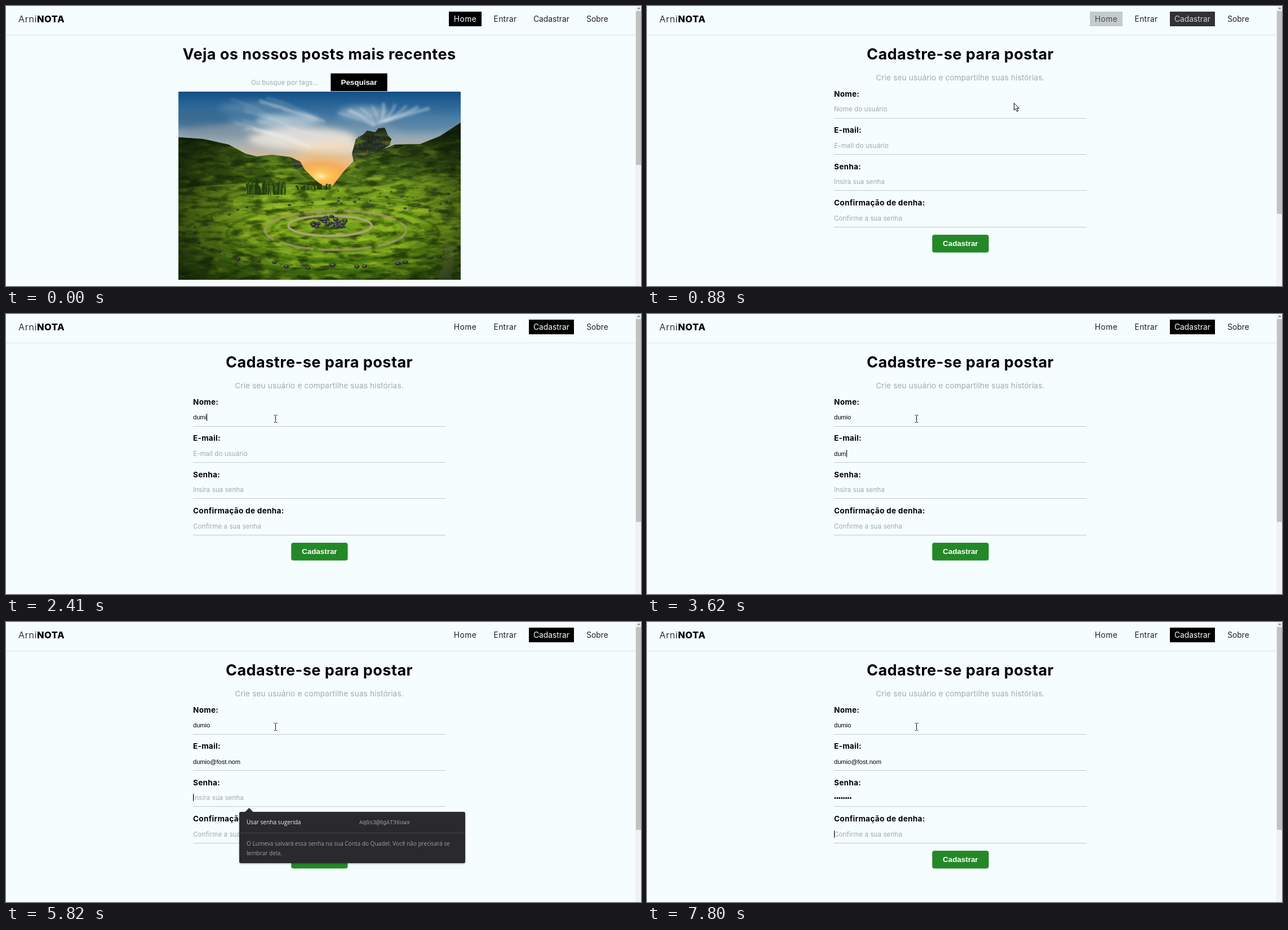
An HTML page for the animation above (8000 ms loop, 1127x497 px).

```html
<!DOCTYPE html>
<html lang="pt-BR">
<head>
<meta charset="utf-8">
<title>Cadastro</title>
<style>
html, body { margin: 0; width: 100%; height: 100%; overflow: hidden; background: #f5fdff; }
svg { display: block; width: 1127px; height: 497px; }
text { font-family: Inter, "Open Sans", sans-serif; font-optical-sizing: none; white-space: pre; }
.arial { font-family: "Liberation Sans", Arial, sans-serif; }
.ui { font-family: "Open Sans", "Noto Sans", sans-serif; }
.mono { font-family: "Liberation Mono", monospace; }
</style>
</head>
<body>
<svg id="stage" viewBox="0 0 1127 497" xmlns="http://www.w3.org/2000/svg">
  <defs>
    <linearGradient id="sky" x1="0" y1="0" x2="0" y2="1">
      <stop offset="0" stop-color="#125089"/>
      <stop offset=".22" stop-color="#3a729f"/>
      <stop offset=".48" stop-color="#97a9b4"/>
      <stop offset=".72" stop-color="#dcc0a0"/>
      <stop offset="1" stop-color="#f39a3a"/>
    </linearGradient>
    <radialGradient id="sun">
      <stop offset="0" stop-color="#fff6c0"/>
      <stop offset=".12" stop-color="#ffc95a"/>
      <stop offset=".4" stop-color="#fba94a" stop-opacity=".75"/>
      <stop offset="1" stop-color="#f8d9a8" stop-opacity="0"/>
    </radialGradient>
    <linearGradient id="left" x1="0" y1="0" x2=".25" y2="1">
      <stop offset="0" stop-color="#3f5a15"/>
      <stop offset=".4" stop-color="#56801a"/>
      <stop offset="1" stop-color="#27420c"/>
    </linearGradient>
    <linearGradient id="right" x1="0" y1="0" x2="0" y2="1">
      <stop offset="0" stop-color="#2d3a16"/>
      <stop offset=".5" stop-color="#446618"/>
      <stop offset="1" stop-color="#648c1e"/>
    </linearGradient>
    <linearGradient id="grass" x1="0" y1="0" x2="0" y2="1">
      <stop offset="0" stop-color="#6f9620"/>
      <stop offset=".45" stop-color="#7ba51c"/>
      <stop offset="1" stop-color="#41700e"/>
    </linearGradient>
    <radialGradient id="shade" cx=".55" cy=".66" r=".62">
      <stop offset=".45" stop-color="#0a1606" stop-opacity="0"/>
      <stop offset="1" stop-color="#0a1606" stop-opacity=".8"/>
    </radialGradient>
    <filter id="soft" x="-30%" y="-60%" width="160%" height="220%"><feGaussianBlur stdDeviation="6"/></filter>
    <filter id="wisp" x="-30%" y="-60%" width="160%" height="220%"><feGaussianBlur stdDeviation="2.2"/></filter>
    <filter id="dark" x="0" y="0" width="100%" height="100%" color-interpolation-filters="sRGB">
      <feTurbulence type="fractalNoise" baseFrequency=".035 .1" numOctaves="4" seed="4"/>
      <feColorMatrix values="0 0 0 0 .07  0 0 0 0 .13  0 0 0 0 .02  3.4 0 0 0 -1.5"/>
    </filter>
    <filter id="lit" x="0" y="0" width="100%" height="100%" color-interpolation-filters="sRGB">
      <feTurbulence type="fractalNoise" baseFrequency=".03 .09" numOctaves="4" seed="11"/>
      <feColorMatrix values="0 0 0 0 .68  0 0 0 0 .8  0 0 0 0 .16  3.4 0 0 0 -1.65"/>
    </filter>
    <filter id="drop" x="-10%" y="-10%" width="120%" height="125%">
      <feDropShadow dx="0" dy="1" stdDeviation="1.5" flood-opacity=".35"/>
    </filter>
    <clipPath id="frame"><rect x="306" y="152" width="501" height="334"/></clipPath>
  </defs>
</svg>
<script>
const LOOP = 8000;
const stage = document.getElementById('stage');

function add(parent, tag, attrs, content) {
  const node = document.createElementNS('http://www.w3.org/2000/svg', tag);
  for (const k in attrs) node.setAttribute(k, attrs[k]);
  if (content) node.textContent = content;
  parent.append(node);
  return node;
}
const group = (parent, attrs = {}) => add(parent, 'g', attrs);
const rect = (parent, x, y, width, height, fill, rx = 0) =>
  add(parent, 'rect', { x, y, width, height, fill, rx });
const path = (parent, d, attrs) => add(parent, 'path', { d, ...attrs });
const text = (parent, x, y, str, size, fill, attrs = {}) =>
  add(parent, 'text', { x, y, 'font-size': size, fill, ...attrs }, str);
const show = (node, on) => node.setAttribute('visibility', on ? 'visible' : 'hidden');
const MID = { 'text-anchor': 'middle' };
const TITLE = { ...MID, 'font-weight': 700, 'letter-spacing': .48 };
const BUTTON = { ...MID, class: 'arial', 'font-weight': 700 };

let seed = 7;
const rnd = (a, b) => {
  seed = (seed * 16807) % 2147483647;
  return a + (b - a) * seed / 2147483647;
};

// header
for (let i = 0; i < 4; i++) {
  rect(stage, 0, 50 + i, 1117, 1, `rgba(20,60,70,${[.06, .045, .028, .012][i]})`);
}
const logo = text(stage, 22, 29, '', 16.4, '#000', { 'letter-spacing': .6 });
add(logo, 'tspan', { 'font-weight': 300 }, 'Arni');
add(logo, 'tspan', { 'font-weight': 800 }, 'NOTA');

const menu = [
  ['Home', 786, 58, .4], ['Entrar', 857, 58, .3], ['Cadastrar', 928, 80, 0], ['Sobre', 1021, 57, 0],
].map(([name, x, w, gap]) => ({
  box: rect(stage, x, 10, w, 26, '#000'),
  label: text(stage, x + w / 2, 28, name, 13.8, '#222', { ...MID, 'letter-spacing': gap }),
}));

function setActive(item, amount) {
  const c = Math.round(30 + 225 * amount);
  item.box.setAttribute('fill-opacity', amount);
  item.label.setAttribute('fill', `rgb(${c},${c},${c})`);
}

// scrollbar
rect(stage, 1117, 0, 10, 497, '#f1f1f1');
path(stage, 'M1120 5.5l3-3.5 3 3.5z', { fill: '#8a8a8a' });
const thumb = rect(stage, 1118, 9, 9, 273, '#c1c1c1');

// home page
const home = group(stage);
text(home, 556, 94.5, 'Veja os nossos posts mais recentes', 27, '#000', TITLE);
text(home, 435, 139.5, 'Ou busque por tags...', 11.5, '#a2a8a9', { 'letter-spacing': .1 });
rect(home, 576.3, 119.6, 100.4, 31.6, '#000');
text(home, 626.5, 139.5, 'Pesquisar', 13.4, '#fff', BUTTON);
drawPhoto(group(home, { 'clip-path': 'url(#frame)' }));

function drawPhoto(g) {
  const rightHill = 'M575 325L600 293 618 274 650 262 690 246 735 245 770 231 807 207V360H575z';
  const rock = 'M617 276L614 262 621 236 634 228 641 221 655 224 661 217 672 216 678 230 684 236 681 247 655 262z';
  const leftHill = 'M306 233L350 236 395 246 425 262 445 267 472 264 505 268 522 276 530 290 548 308 566 322 540 340H306z';
  const field = 'M306 325Q420 308 540 318T700 310T807 300V486H306z';
  const land = add(g, 'clipPath', { id: 'land' });
  for (const d of [rightHill, rock, leftHill, field]) path(land, d);

  rect(g, 306, 152, 501, 172, 'url(#sky)');
  const clouds = group(g, { filter: 'url(#soft)' });
  [[525, 235, 95, 20, '#f3e9de', .8], [500, 203, 55, 11, '#d3dde2', .65], [340, 200, 60, 18, '#2f648c', .65],
   [385, 224, 70, 10, '#8194a0', .8], [740, 208, 60, 14, '#4d7fa5', .6], [590, 252, 80, 12, '#f6e0c2', .8],
   [635, 190, 45, 12, '#c3d2da', .5], [440, 180, 60, 9, '#6d93b0', .6]]
    .forEach(([cx, cy, rx, ry, fill, opacity]) => add(clouds, 'ellipse', { cx, cy, rx, ry, fill, opacity }));
  const wisps = group(g, { filter: 'url(#wisp)', fill: 'none', stroke: '#eef1f2', 'stroke-linecap': 'round' });
  for (let i = 0; i < 9; i++) {
    path(wisps, `M${650 + i * 3} ${212 - i}q${-25 + i * 9} -14 ${-60 + i * 17} ${-34 + Math.abs(i - 4) * 3}`,
      { 'stroke-width': rnd(2, 6), opacity: .42 });
  }
  for (let i = 0; i < 16; i++) {
    const x = rnd(380, 500), y = rnd(160, 225);
    path(wisps, `M${x} ${y}q40 ${rnd(4, 12)} ${rnd(60, 120)} ${rnd(20, 38)}`,
      { 'stroke-width': rnd(1, 5), opacity: rnd(.15, .45) });
  }
  add(g, 'ellipse', { cx: 558, cy: 302, rx: 110, ry: 56, fill: 'url(#sun)' });

  path(g, rightHill, { fill: 'url(#right)' });
  path(g, rock, { fill: '#3a4238' });
  for (let i = 0; i < 26; i++) {
    const x = rnd(623, 676), y = rnd(228, 252);
    path(g, `M${x} ${y}l${rnd(-3, 3)} ${rnd(4, 9)}`, { stroke: i % 2 ? '#6f7a70' : '#20282a', opacity: .7 });
  }
  path(g, leftHill, { fill: 'url(#left)' });
  path(g, 'M438 268Q475 262 498 275L540 312 480 318Q460 290 438 268z', { fill: '#7da328', opacity: .5 });
  path(g, 'M505 269L523 277 529 292 516 290 508 280z', { fill: '#3d443a' });
  path(g, field, { fill: 'url(#grass)' });

  const ring = (cx, cy, rx, ry, stroke, w, opacity, dash = 'none') => add(g, 'ellipse',
    { cx, cy, rx, ry, fill: 'none', stroke, 'stroke-width': w, opacity, 'stroke-dasharray': dash });
  ring(578, 408, 262, 66, '#35600f', 6, .4);
  ring(578, 406, 235, 56, '#9cc030', 8, .35);
  ring(580, 404, 188, 49, '#35600f', 5, .45);
  ring(582, 400, 156, 42, '#9cc42c', 9, .4);
  ring(582, 398, 110, 29, '#3f6f12', 6, .45);
  ring(577, 394, 92, 23, '#93bd2a', 8, .5);

  // uneven light over the grass
  const relief = group(g, { 'clip-path': 'url(#land)' });
  rect(relief, 306, 200, 501, 286, '#000').setAttribute('filter', 'url(#lit)');
  rect(relief, 306, 200, 501, 286, '#000').setAttribute('filter', 'url(#dark)');
  relief.setAttribute('opacity', .6);

  ring(585, 398, 125, 35, '#a3956c', 4, .75, '60 12 95 8');
  ring(575, 390, 74, 18, '#b3a580', 4, .9);

  for (let i = 0; i < 80; i++) {
    const x = i < 55 ? rnd(428, 496) : rnd(515, 585), h = i < 55 ? rnd(14, 25) : rnd(4, 11);
    path(g, `M${x} ${i < 55 ? 335 : 326}q${rnd(-3, 3)} ${-h / 2} ${rnd(-4, 4)} ${-h}`,
      { fill: 'none', stroke: i % 3 ? '#24400f' : '#3f6119', 'stroke-width': 3 });
  }

  const stone = (cx, cy, r) => {
    add(g, 'ellipse', { cx, cy, rx: r, ry: r * .65, fill: '#2f3330' });
    add(g, 'ellipse', { cx: cx - r * .15, cy: cy - r * .2, rx: r * .5, ry: r * .25, fill: '#757a76' });
  };
  for (let i = 0; i < 44; i++) {
    const a = i / 44 * Math.PI * 2 + rnd(-.07, .07), k = rnd(.94, 1.05);
    stone(578 + 245 * k * Math.cos(a), 405 + 58 * k * Math.sin(a), rnd(1.5, 3) + 2.5 * Math.max(0, Math.sin(a)));
  }
  for (let i = 0; i < 22; i++) stone(rnd(560, 800), rnd(326, 356), rnd(1.5, 3.5));
  for (let i = 0; i < 60; i++) {
    const x = rnd(-31, 31);
    stone(575 + x, rnd(372 + Math.abs(x) * .35, 393), rnd(2.5, 5));
  }
  path(g, 'M765 486Q785 450 776 420L791 424Q798 455 790 486z', { fill: '#8e8a66', opacity: .4 });
  const corners = group(g, { 'clip-path': 'url(#land)' });
  rect(corners, 306, 152, 501, 334, 'url(#shade)');
}

// sign-up form
const form = group(stage);
text(form, 556, 94.5, 'Cadastre-se para postar', 27, '#000', TITLE);
text(form, 556, 132, 'Crie seu usuário e compartilhe suas histórias.', 13.5, '#a3a9aa',
  { ...MID, 'letter-spacing': .2 });
const fields = [
  ['Nome:', 'Nome do usuário'], ['E-mail:', 'E-mail do usuário'],
  ['Senha:', 'Insira sua senha'], ['Confirmação de denha:', 'Confirme a sua senha'],
].map(([label, hint], i) => {
  const dy = i * 64.4;
  text(form, 332, 161 + dy, label, 13.5, '#000', { 'font-weight': 700, 'letter-spacing': .34 });
  rect(form, 332, Math.floor(199 + dy), 448, 1, '#c4cacd');
  return {
    hint: text(form, 332, 187.3 + dy, hint, 11.5, '#a2a8aa', { 'letter-spacing': .1 }),
    value: text(form, 332, 187.3 + dy, '', 11.1, '#000', { class: 'arial' }),
  };
});
rect(form, 506.2, 406, 100.3, 31.5, '#238926', 4);
text(form, 556.3, 426, 'Cadastrar', 13.4, '#fff', BUTTON);
const caret = rect(form, 332, 177, 1, 13, '#000');

// browser popups
const DARK = '#292a2d';
function popup(y, width, height) {
  const g = group(stage, { filter: 'url(#drop)' });
  rect(g, 414, y, width, height, DARK, 3);
  path(g, `M424 ${y + .5}l7.5-7.5 7.5 7.5z`, { fill: DARK });
  return g;
}
const names = popup(207, 70, 187);
['Breno', 'pauta', 'breno', 'Gustavo', 'gustavo', 'sandra'].forEach((name, i) =>
  text(names, 423.5, 230 + i * 30.1, name, 10.4, '#e8eaed', { class: 'ui' }));

const hintBox = popup(337, 401, 91);
rect(hintBox, 414, 374, 401, 1, '#414347');
text(hintBox, 427, 359, 'Usar senha sugerida', 10.1, '#f1f3f4', { class: 'ui' });
text(hintBox, 627, 358.5, 'AqGs3@6gAT36uwx', 10, '#9aa0a6', { class: 'mono' });
text(hintBox, 427, 397, 'O Lumeva salvará essa senha na sua Conta do Quadel. Você não precisará se',
  10.1, '#9aa0a6', { class: 'ui' });
text(hintBox, 427, 413.5, 'lembrar dela.', 10.1, '#9aa0a6', { class: 'ui' });

// pointers, drawn around their hot spots
const arrow = path(stage, 'M.5.5V13L3.4 10.3 5.6 15.2 7.8 14.2 5.7 9.5H9.6z',
  { fill: '#fff', stroke: '#000', 'stroke-width': 1 });
const beam = path(stage, 'M-3-6.5H-1L0-5.5 1-6.5H3M0-5.5V5.5M-3 6.5H-1L0 5.5 1 6.5H3',
  { fill: 'none', stroke: '#111', 'stroke-width': 1 });

const SWITCH = 600, FADE = 600;
// time, x, y
const route = [
  [67, 1090, 150], [330, 978, 32], [600, 966, 24], [878, 651, 172],
  [1010, 586, 252], [1080, 545, 270], [1200, 488, 205], [1282, 478.5, 186],
];
const typing = [
  { str: 'dumio', at: [1880, 2150, 2260, 2370, 2480] },
  { str: 'dumio@fost.nom', at: [3270, 3470, 3620, 3680, 3810, 4140, 4530, 4600, 4800, 4870, 5140, 5410, 5480, 5550] },
  { str: '••••••••', at: [6690, 6880, 7010, 7140, 7270, 7470, 7540, 7670] },
  { str: '', at: [] },
];
const focusAt = [1490, 2810, 5820, 7800];

function along(t) {
  const i = route.findIndex(p => p[0] > t);
  if (i < 0) return route[route.length - 1].slice(1);
  const [a, b] = [route[Math.max(i - 1, 0)], route[i]];
  const u = a === b ? 0 : (t - a[0]) / (b[0] - a[0]);
  const s = u * u * (3 - 2 * u);
  return [a[1] + (b[1] - a[1]) * s, a[2] + (b[2] - a[2]) * s];
}

function render(t) {
  const tick = Math.floor(t / 67.5) * 67.5;
  const joined = tick >= SWITCH;
  show(home, !joined);
  show(form, joined);
  thumb.setAttribute('height', joined ? 360 : 273);

  const u = Math.min(1, Math.max(0, (tick - SWITCH) / FADE));
  const on = 1 - (1 - u) ** 2.6;
  menu.forEach((item, i) => setActive(item, i === 0 ? 1 - on : i === 2 ? on : 0));

  const [x, y] = along(tick);
  const overField = tick >= 1200;
  for (const p of [arrow, beam]) p.setAttribute('transform', `translate(${x} ${y})`);
  show(arrow, tick >= 67 && !overField);
  show(beam, overField);

  let focus = -1;
  focusAt.forEach((at, i) => { if (t >= at) focus = i; });
  fields.forEach(({ hint, value }, i) => {
    const { str, at } = typing[i];
    const typed = str.slice(0, at.filter(ms => ms <= t).length);
    if (value.textContent !== typed) value.textContent = typed;
    show(hint, joined && !typed);
    if (i === focus) {
      caret.setAttribute('x', typed ? Math.round(332 + value.getComputedTextLength()) : 332);
      caret.setAttribute('y', Math.floor(177 + i * 64.4));
    }
  });
  show(caret, focus >= 0 && !(t >= 6350 && t < 6690));

  show(names, t >= 1490 && t < 1880);
  names.setAttribute('opacity', t < 1550 ? .5 : 1);
  show(hintBox, t >= 5820 && t < 7800);
}

const start = performance.now();
function loop() {
  render((performance.now() - start) % LOOP);
  requestAnimationFrame(loop);
}
render(0);
requestAnimationFrame(loop);
</script>
</body>
</html>
```
